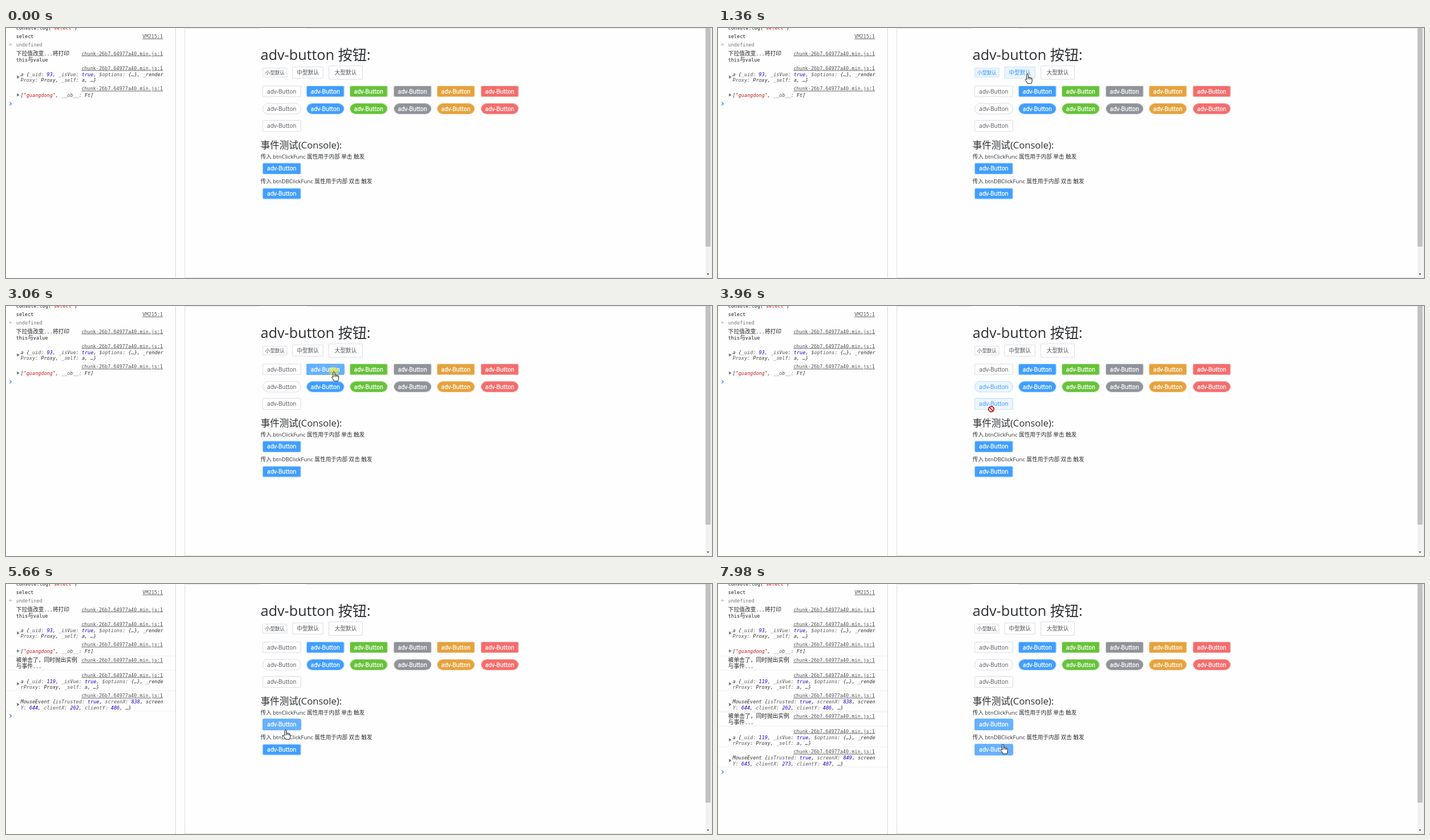
Animation of 1255x446 px, one loop 8 s. Source, as an HTML page:

```html
<!DOCTYPE html>
<html lang="zh-CN">
<head>
<meta charset="utf-8">
<title>adv-button</title>
<style>
  html, body { margin: 0; width: 100%; height: 100%; overflow: hidden; background: #fefefe; }
  svg { display: block; width: 1255px; height: 446px; }
  text { white-space: pre; font-family: "Open Sans", "Noto Sans CJK SC", "Noto Sans CJK", sans-serif; }
  .mono { font: 8.6px "DejaVu Sans Mono", "Noto Sans CJK SC", "Noto Sans CJK", monospace; fill: #222; }
  .cjk { font-size: 9.9px; }
  .link { fill: #555; text-decoration: underline; text-anchor: end; }
  .obj { font-style: italic; fill: #303030; }
</style>
</head>
<body>
<svg id="stage" viewBox="0 0 1255 446"></svg>
<script>
const NS = 'http://www.w3.org/2000/svg';
const stage = document.getElementById('stage');

function el(parent, tag, attrs, text) {
  const node = document.createElementNS(NS, tag);
  for (const key in attrs) node.setAttribute(key, attrs[key]);
  if (text !== undefined) node.textContent = text;
  parent.appendChild(node);
  return node;
}
const rect = (x, y, width, height, fill) => el(stage, 'rect', { x, y, width, height, fill });

// Page frame and scrollbar
rect(301, 0, 1, 446, '#d6d6d6');
rect(317.5, 0, 1, 446, '#dcdcdc');
rect(318, 445, 936, 1, '#dcdcdc');
rect(318, 0, 132, 1, '#e4e4e4');
rect(533, 0, 711, 1, '#e4e4e4');
rect(1243.5, 0, 9, 446, '#f1f1f1');
rect(1243.5, 0, 9, 390, '#c1c1c1');
rect(1253.5, 0, 1, 446, '#e2e2e2');
el(stage, 'path', { d: 'M1245.5 438h4.6l-2.3 2.6z', fill: '#444' });

// Console
const LINK = 'chunk-26b7.64977a40.min.js:1';
const TOKENS = /("[^"]*"|\b(?:true|\d+)\b|[$\w]+:|[\u3000-\u9fff\uff00-\uffef]+)/;

function line(g, x, y, str, cls = '') {
  const t = el(g, 'text', { x, y, class: 'mono ' + cls });
  for (const part of str.split(TOKENS)) {
    if (!part) continue;
    const span = el(t, 'tspan', {}, part);
    if (/^[\u3000-\uffef]/.test(part)) span.setAttribute('class', 'cjk');
    else if (part[0] === '"') span.setAttribute('fill', '#c41a16');
    else if (/^(true|\d+)$/.test(part)) span.setAttribute('fill', '#1c00cf');
    else if (/:$/.test(part)) span.setAttribute('fill', '#565656');
  }
}
const link = (g, y, str = LINK) => el(g, 'text', { x: 279, y, class: 'mono link' }, str);
const caret = (g, y) => el(g, 'path', { d: `M19.5 ${y - 3}l4.5 3l-4.5 3z`, fill: '#727272' });
const rule = (g, y) => el(g, 'rect', { x: 0, y, width: 301, height: 1, fill: '#f0f0f0' });

line(stage, 18, 2.5, 'console.log("select")');
line(stage, 18, 18, 'select');
link(stage, 18, 'VM215:1');
el(stage, 'path', { d: 'M11 29.5H6M8.5 27L6 29.5L8.5 32', fill: 'none', stroke: '#b5b5b5' });
el(stage, 'text', { x: 18, y: 33, class: 'mono', style: 'fill:#777' }, 'undefined');
line(stage, 18, 48.5, '下拉值改变...将打印');
line(stage, 18, 59.5, 'this与value');
link(stage, 48.5);
link(stage, 74.5);
caret(stage, 87.5);
line(stage, 26, 85.5, 'a {_uid: 93, _isVue: true, $options: {…}, _render', 'obj');
line(stage, 26, 96, 'Proxy: Proxy, _self: a, …}', 'obj');
link(stage, 111);
caret(stage, 119.5);
line(stage, 26, 123, '["guangdong", __ob__: Ft]', 'obj');

function clickLog(dy, at, [sx, sy, cx, cy]) {
  const g = el(stage, 'g', { transform: `translate(0 ${dy})` });
  [128, 153, 190, 226].forEach(y => rule(g, y));
  line(g, 18, 139, '被单击了，同时抛出实例');
  line(g, 18, 150, '与事件...');
  [139, 165.5, 202].forEach(y => link(g, y));
  caret(g, 178);
  line(g, 26, 176.5, 'a {_uid: 119, _isVue: true, $options: {…}, _rende', 'obj');
  line(g, 26, 187, 'rProxy: Proxy, _self: a, …}', 'obj');
  caret(g, 215);
  line(g, 26, 213, `MouseEvent {isTrusted: true, screenX: ${sx}, screen`, 'obj');
  line(g, 26, 223.5, `Y: ${sy}, clientX: ${cx}, clientY: ${cy}, …}`, 'obj');
  return { g, at };
}
const logs = [
  clickLog(0, 5200, [838, 644, 262, 486]),
  clickLog(100, 7770, [849, 645, 273, 487])
];
const prompt = el(stage, 'path', { d: 'M6.5 132.5l3 2.7l-3 2.7', fill: 'none', stroke: '#3b82f0', 'stroke-width': 1.3 });

// Headings and notes
const label = (x, y, size, str, fill = '#2c2f33') =>
  el(stage, 'text', { x, y, 'font-size': size, fill }, str);
label(452.5, 56.5, 25.5, 'adv-button 按钮:');
label(452.5, 214.5, 16.8, '事件测试(Console):');
label(452.5, 232.5, 9.75, '传入 btnClickFunc 属性用于内部 单击 触发');
label(452.5, 276.5, 9.75, '传入 btnDBClickFunc 属性用于内部 双击 触发');

// Buttons
const buttons = [];
// edge: opacity of the border line
function face(x, y, w, h, r, { fill, border = fill, color = '#fff', edge = 1 }, str, size) {
  const g = el(stage, 'g', {});
  const inset = edge < 1 ? 1 : .5;
  el(g, 'rect', { x: x + .5, y: y + .5, width: w - 1, height: h - 1, rx: r, fill: 'none', stroke: border, 'stroke-opacity': edge });
  el(g, 'rect', { x: x + inset, y: y + inset, width: w - 2 * inset, height: h - 2 * inset, rx: r, fill });
  if (edge === 1) el(g, 'rect', { x: x + .5, y: y + .5, width: w - 1, height: h - 1, rx: r, fill: 'none', stroke: border });
  el(g, 'text', {
    x: x + w / 2, y: y + h / 2 + size * .36, fill: color, 'font-size': size, 'text-anchor': 'middle',
    stroke: color, 'stroke-width': color === '#fff' ? .35 : .1
  }, str);
  return g;
}
// hover: list of [start, end] spans
function button(x, y, w, h, { color, hover = [], round, off, str = 'adv-Button', size = 10 }) {
  const r = round ? (h - 1) / 2 : 1.5;
  const draw = look => face(x, y, w, h, r, look, str, size);
  draw(color ? { fill: color, edge: .5 } : { fill: '#fff', border: '#dcdfe6', color: '#606266' });
  if (!hover.length) return;
  const over = draw(color ? { fill: '#66b1ff' } : { fill: '#ecf5ff', border: '#c6e2ff', color: '#409eff' });
  buttons.push({ x, y, w, h, off, hover, over });
}

const BLUE = '#409eff';
const COLORS = ['', BLUE, '#67c23a', '#909399', '#e6a23c', '#f56c6c'];
button(456, 71, 44, 17, { str: '小型默认', size: 8.6, hover: [[640, 1560]] });
button(509, 69, 55, 21, { str: '中型默认', size: 9.75, hover: [[1260, 2220]] });
button(573.5, 67, 60.5, 25, { str: '大型默认', size: 9.75 });
const rowHover = [[[[2000, 2750]], [[2720, 3290]]], [[[3540, 4170]], [[3300, 3800]]]];
[103, 134].forEach((y, row) => COLORS.forEach((color, i) =>
  button(456 + Math.round(i * 77.6), y, i ? 67.5 : 68.5, 20, { color, round: row, hover: rowHover[row][i] })));
button(456, 164.5, 68.5, 20.5, { off: true, hover: [[3830, 4220]] });
button(456, 240.5, 68.5, 20.5, { color: BLUE, hover: [[4560, 6040], [7250, 9000]] });
button(456, 285.5, 68.5, 20, { color: BLUE, hover: [[5800, 7490], [7840, 9000]] });

// Pointer
const halo = el(stage, 'circle', { r: 8.7, fill: '#ffee00', opacity: .5 });
const shapes = {
  hand: el(stage, 'path', {
    d: 'M-1.4 10V1.6a1.4 1.4 0 0 1 2.8 0V6.4a1.3 1.3 0 0 1 2.5.4a1.3 1.3 0 0 1 2.4.6a1.2 1.2 0 0 1 2 .9V12q0 2.5-1.4 5H.3Q-1.2 14-3.7 11.2c-1-1.3.6-2.6 1.6-1.5zM1.4 6.4V9.4M3.9 6.8V9.6M6.3 7.4V9.8',
    fill: '#fff', stroke: '#111', 'stroke-width': 1, 'stroke-linejoin': 'round'
  }),
  arrow: el(stage, 'path', {
    d: 'M.5 .5V15.5L4 12.3L6.4 17.7L8.6 16.8L6.3 11.5H11z', fill: '#fff', stroke: '#111', 'stroke-width': 1
  }),
  stop: el(stage, 'path', {
    d: 'M-4.8 0a4.8 4.8 0 1 0 9.6 0a4.8 4.8 0 1 0-9.6 0M-3.4-3.4L3.4 3.4', fill: '#fff', stroke: '#d0101c', 'stroke-width': 1.9
  })
};

// Each move: first step, last step, number of steps, end point
const START = [727, 428];
const moves = [
  [110, 720, 13, 483.5, 82],
  [1230, 1360, 4, 550, 82],
  [1840, 2070, 6, 497, 121],
  [2600, 2850, 6, 583, 117],
  [3260, 3380, 3, 586, 143],
  [3480, 3610, 4, 485, 146],
  [3760, 3960, 4, 485.7, 184],
  [4170, 4650, 10, 498, 252],
  [5660, 5890, 6, 492, 301],
  [6550, 6550, 1, 493, 301],
  [6730, 6830, 3, 491.5, 297.5],
  [7210, 7340, 4, 509, 253.5],
  [7770, 7980, 6, 506.5, 286]
];
const clicks = [[900, 980], [1560, 1660], [2220, 2320], [3060, 3160], [4870, 4970], [6040, 6140], [6880, 7010], [7490, 7590]];

const clamp = v => Math.max(0, Math.min(1, v));
const within = (t, spans) => spans.some(([a, b]) => t >= a && t < b);

function pointerAt(t) {
  let [x, y] = START;
  for (const [from, to, n, ex, ey] of moves) {
    if (t < from) break;
    const gap = (to - from) / (n - 1 || 1) || 1;
    const u = clamp((Math.floor((t - from) / gap + 1e-6) + 1) / n);
    x += (ex - x) * u;
    y += (ey - y) * u;
  }
  return [x, y];
}

function render(t) {
  const [x, y] = pointerAt(t);
  const hit = buttons.find(b => x >= b.x && x <= b.x + b.w && y >= b.y && y <= b.y + b.h);
  const kind = !hit ? 'arrow' : hit.off ? 'stop' : 'hand';
  for (const name in shapes) {
    shapes[name].setAttribute('visibility', t >= 110 && name === kind ? 'visible' : 'hidden');
    shapes[name].setAttribute('transform', `translate(${x} ${y})`);
  }
  halo.setAttribute('cx', x);
  halo.setAttribute('cy', y);
  halo.setAttribute('visibility', within(t, clicks) ? 'visible' : 'hidden');

  for (const b of buttons) {
    const level = Math.max(...b.hover.map(([a, z]) => Math.min(clamp((t - a) / 100), 1 - clamp((t - z) / 100))));
    b.over.setAttribute('opacity', level);
  }
  let shown = 0;
  for (const { g, at } of logs) {
    g.setAttribute('visibility', t >= at ? 'visible' : 'hidden');
    if (t >= at) shown++;
  }
  prompt.setAttribute('transform', `translate(0 ${shown * 100})`);
}

let begin;
function tick(now) {
  begin ??= now;
  render((now - begin) % 8000);
  requestAnimationFrame(tick);
}
render(0);
requestAnimationFrame(tick);
</script>
</body>
</html>
```
